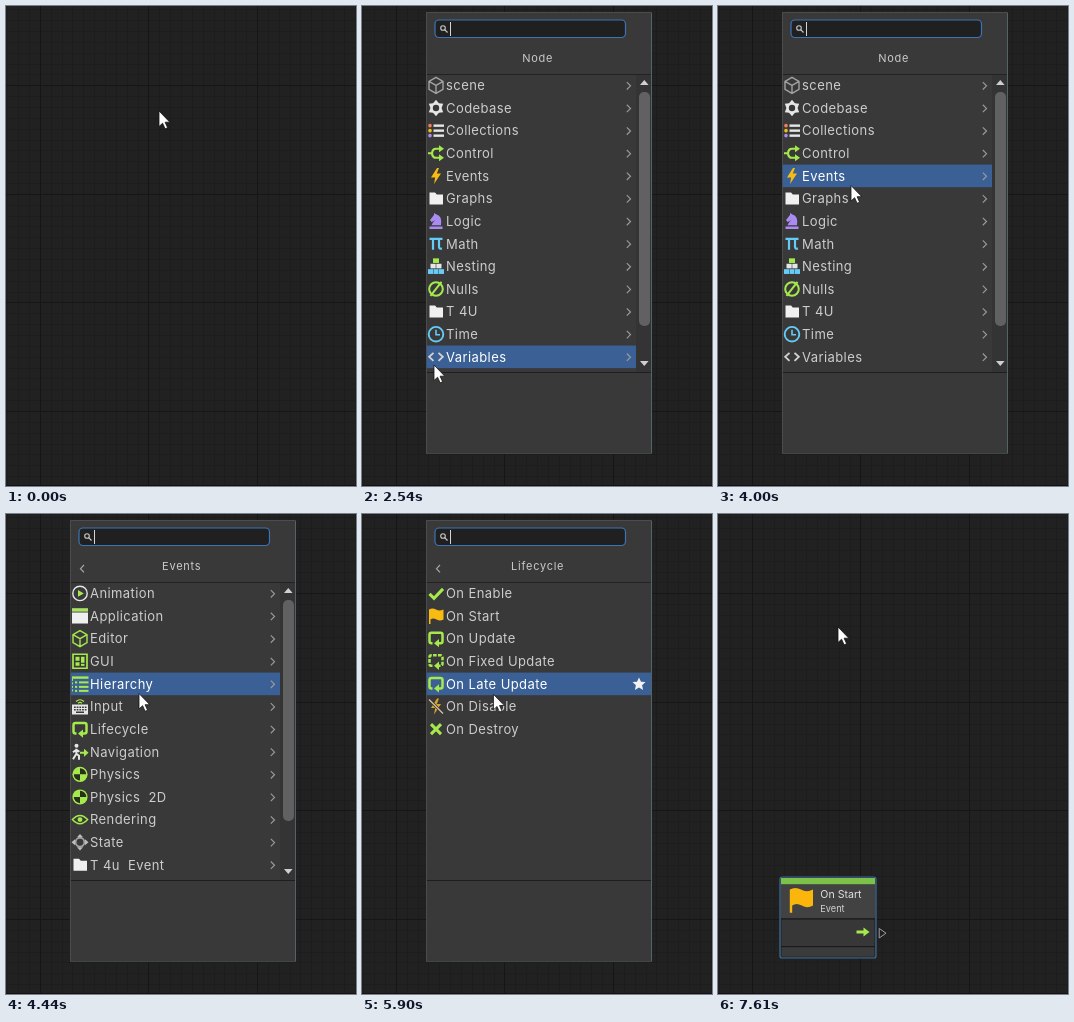
Animation, 350 px wide and 480 px high, one loop 7740 ms. Source, as an HTML page:

```html
<!DOCTYPE html>
<html lang="en">
<head>
<meta charset="utf-8">
<title>Node menu</title>
<style>
html, body { margin: 0; width: 100%; height: 100%; overflow: hidden; background: #212121; }
svg { display: block; width: 350px; height: 480px; }
text { font-family: Inter, Roboto, sans-serif; white-space: pre; }
.row { font-size: 13px; letter-spacing: .42px; fill: #cdcdcd; }
.row.on { fill: #fff; }
.title { font-size: 11px; letter-spacing: .75px; fill: #cacaca; text-anchor: middle; }
</style>
</head>
<body>
<svg id="stage" viewBox="0 0 350 480" xmlns="http://www.w3.org/2000/svg"></svg>
<script>
const LOOP = 7740, ROW = 22.62, TOP = 79.4, WIDTH = 226;
const OPEN = 2410, CLOSE = 7230, SLIDES = [4190, 5330], SLIDE_MS = 250;

const GREEN = '#a6e94d', WHITE = '#e6e6e6', YELLOW = '#f8bb12', BLUE = '#66cbf6', PURPLE = '#a98bf2', GREY = '#a2a2a2';

const fill = (d, c) => `<path d="${d}" fill="${c}"/>`;
const line = (d, c, w = 1.6, more = '') => `<path d="${d}" fill="none" stroke="${c}" stroke-width="${w}" ${more}/>`;
const rect = (x, y, w, h, c, more = '') => `<rect x="${x}" y="${y}" width="${w}" height="${h}" fill="${c}" ${more}/>`;
const ring = (r, c, w, more = '') => `<circle r="${r}" fill="none" stroke="${c}" stroke-width="${w}" ${more}/>`;
const dot = (x, y, r, c) => `<circle cx="${x}" cy="${y}" r="${r}" fill="${c}"/>`;
const text = (x, y, str, more) => `<text x="${x}" y="${y}" ${more}>${str}</text>`;

const cube = c => line('M0-8L7-4V4L0 8L-7 4V-4ZM-7-4L0 0L7-4M0 0V8', c, 1.4);
const bolt = c => fill('M1-8L-5 1.5H-.8L-2 8L5-2.5H.8L3-8Z', c);
const loop = dash => line('M-3.5 4.5H-4.5Q-6.5 4.5-6.5 2.5V-4Q-6.5-6-4.5-6H4.5Q6.5-6 6.5-4V2.5Q6.5 4.5 4.5 4.5H2', GREEN, 2.5,
  dash ? 'stroke-dasharray="3.6 1.3"' : '') + fill('M3 .3V8.7L-2 4.5Z', GREEN);
const flag = 'M-7-6.5Q-3.5-8.5 0-6.5T7.5-6.5V3.5Q4 5.5 .5 3.5T-5.5 3.5V8H-7Z';

const icons = {
  cube: cube(GREY),
  gear: ring(4.5, WHITE, 2.6) + [0, 60, 120, 180, 240, 300].map(a =>
    `<path d="M-2.6-5L0-8.3L2.6-5Z" fill="${WHITE}" transform="rotate(${a})"/>`).join(''),
  list: [['#ee8155', -5], [YELLOW, 0], [PURPLE, 5]].map(([c, y]) =>
    dot(-6, y, 1.8, c) + rect(-2.5, y - 1.2, 10.5, 2.4, WHITE)).join(''),
  branch: line('M-8 0H-4Q-3.5-4.5 0-4.5H4M-4 0Q-3.5 4.5 0 4.5H4', GREEN, 2.2)
    + fill('M3-8L8-4.5L3-1ZM3 1L8 4.5L3 8Z', GREEN),
  bolt: bolt(YELLOW),
  folder: fill('M-6.5-6H-1L.8-4H7V6H-6.5Z', '#f0f0f0'),
  knight: fill('M-6.5 8V5.5H6.5V8ZM-4.5 4.2Q-4 1-.5-.8L-4.5 .8L-6-1.2L-2-6L-2-8L.5-6.6Q6.5-5 5 4.2Z', PURPLE),
  pi: line('M-6.5-4.8H6.5M-3-5V6M3-5V3Q3 5.5 6 4.8', BLUE, 2.2),
  tree: rect(-3, -8, 6, 4.6, GREEN) + rect(-5.5, -2.6, 5.2, 4.6, WHITE)
    + rect(.3, -2.6, 5.2, 4.6, WHITE) + [-8, -2.5, 3].map(x => rect(x, 2.8, 5, 4.8, BLUE)).join(''),
  nil: ring(6.8, GREEN, 2) + line('M-5.5 7L5.5-7', GREEN, 2),
  clock: ring(7.3, BLUE, 1.9) + line('M0-4.5V.5H4', BLUE, 1.6),
  angle: line('M-2.5-4L-6.8 0L-2.5 4M2.5-4L6.8 0L2.5 4', '#d0d0d0', 1.9),
  play: ring(7.2, WHITE, 1.4) + fill('M-2-3.4L3.8 0L-2 3.4Z', GREEN),
  app: rect(-8, -7.5, 16, 15, '#efefef') + rect(-8, -7.5, 16, 3, GREEN) + rect(-8, -4.5, 16, 1, '#484848'),
  editor: cube(GREEN),
  gui: line('M-7-7H7V7H-7Z', GREEN, 1.7) + rect(-4.5, -4.5, 4, 4, GREEN) + rect(1, -4.5, 3.5, 6, GREEN)
    + rect(-4.5, 1, 4, 3.5, GREEN) + rect(1, 2.6, 3.5, 2, GREEN),
  outline: rect(-8, -7.5, 16.5, 2.4, GREEN)
    + [-2.5, 2, 6].map(y => rect(-5, y, 2.2, 2, GREEN) + rect(-1, y, 9.5, 2, GREEN)).join('') + line('M-7.5-5V7.5', GREEN, 1, 'stroke-dasharray="2 1.5"'),
  keys: rect(-8, -2, 16, 10, WHITE) + line('M-6 .8H6.5M-6 3.2H6.5', '#383838', 1.4, 'stroke-dasharray="1.7 1"')
    + line('M-4 5.8H4', '#383838', 1.4) + line('M-4-5Q0-8.5 4-5M-2-3.2Q0-5 2-3.2', GREEN, 1.2),
  loop: loop(false),
  dashed: loop(true),
  walk: dot(-3.5, -6, 2, WHITE) + line('M-3.6-3V2L-1 4V8M-3.6 2L-7 7.5M-3.6-2L-7 .5M-3.6-2L-.6 0', WHITE, 2)
    + line('M0 1H5', GREEN, 2.2) + fill('M4-3L8.5 1L4 5Z', GREEN),
  ball: dot(0, 0, 7.6, GREEN) + fill('M0 0V-6.2A6.2 6.2 0 0 1 6.2 0ZM0 0V6.2A6.2 6.2 0 0 1-6.2 0Z', '#26301c'),
  eye: line('M-7.6 0Q0-8.4 7.6 0Q0 8.4-7.6 0Z', GREEN, 1.5) + dot(0, 0, 2.4, GREEN),
  state: ring(4.4, GREY, 1.9) + fill('M0-8.2L3-5H-3ZM0 8.2L3 5H-3ZM-8.5 0L-5-3V3ZM8.5 0L5-3V3Z', '#bcbcbc'),
  check: line('M-6.5 .5L-2 5L7-4.5', GREEN, 3),
  flag: fill(flag, YELLOW),
  off: bolt('#dba52a') + line('M-7-7L7 7', '#393939', 3) + line('M-7-7L7 7', '#d2c6a4', 1.3),
  cross: line('M-5-5L5 5M5-5L-5 5', GREEN, 3)
};

const panels = [
  { title: 'Node', thumb: 234, rows: [['scene', 'cube'], ['Codebase', 'gear'], ['Collections', 'list'], ['Control', 'branch'],
    ['Events', 'bolt'], ['Graphs', 'folder'], ['Logic', 'knight'], ['Math', 'pi'], ['Nesting', 'tree'], ['Nulls', 'nil'],
    ['T 4U', 'folder'], ['Time', 'clock'], ['Variables', 'angle']] },
  { title: 'Events', thumb: 221, back: true, rows: [['Animation', 'play'], ['Application', 'app'], ['Editor', 'editor'], ['GUI', 'gui'],
    ['Hierarchy', 'outline'], ['Input', 'keys'], ['Lifecycle', 'loop'], ['Navigation', 'walk'], ['Physics', 'ball'],
    ['Physics  2D', 'ball'], ['Rendering', 'eye'], ['State', 'state'], ['T 4u  Event', 'folder']] },
  { title: 'Lifecycle', back: true, rows: [['On Enable', 'check'], ['On Start', 'flag'], ['On Update', 'loop'],
    ['On Fixed Update', 'dashed'], ['On Late Update', 'loop'], ['On Disable', 'off'], ['On Destroy', 'cross']] }
];

// time, x, y of the pointer tip
const path = [
  [450, 153, 105], [700, 177, 162], [1020, 108, 285], [1210, 74, 350], [1270, 72, 359],
  [2540, 72, 359], [3050, 95, 294.5], [3240, 95, 294.5], [3930, 133, 179.5], [4600, 133, 179.5],
  [4890, 133, 205.5], [5700, 133, 205.5], [6470, 127, 108.5], [7170, 127, 108.5], [7550, 120, 113]
];

function grid() {
  const lines = (step, x0, y0) => {
    let d = '';
    for (let x = x0; x < 350; x += step) d += `M${Math.round(x) + .5} 0V480`;
    for (let y = y0; y < 480; y += step) d += `M0 ${Math.round(y) + .5}H350`;
    return d;
  };
  const big = 108.6, small = big / 10;
  return rect(0, 0, 350, 480, '#212121') + line(lines(small, 1.2, 3.2), '#1d1d1d', 1)
    + line(lines(big, 33.6, 79), '#161616', 1) + rect(0, 479, 350, 1, '#180f14');
}

function panel({ title, thumb, back, rows }) {
  const body = rows.map(([label, icon], i) => {
    const y = TOP + i * ROW;
    return `<g transform="translate(74 ${y})">${icons[icon]}</g>` + text(84, y + 4.8, label, 'class="row"')
      + (thumb ? line(`M264.8 ${y - 3.3}l3.7 3.7l-3.7 3.7`, '#989898', 1.2) : '');
  }).join('');
  const star = 'M0-6.5L2-2.2L6.5-1.8L3.1 1.3L4.1 6L0 3.5L-4.1 6L-3.1 1.3L-6.5-1.8L-2-2.2Z';
  const bar = rect(274, 69, 15, 297, '#343434') + rect(277, 86, 11, thumb, '#616161', 'rx="5"')
    + fill('M278 79L282.3 74L286.6 79ZM278 355L282.3 360L286.6 355Z', '#cfcfcf');
  return `<g class="panel">${text(175.7, 56, title, 'class="title"')}
    ${back ? line('M78 51L74.5 54.7L78 58.4', '#a6a6a6', 1.2) : ''}
    <g class="hover">${rect(64.5, -11.3, thumb ? 209.5 : 224.5, 22.6, '#3a6096')}
    ${thumb ? '' : `<g transform="translate(277)">${fill(star, '#f2f2f2')}</g>`}</g>${body}${thumb ? bar : ''}</g>`;
}

const menu = rect(64, 6, 226, 442, '#393939') + line('M64.5 448V6.5H289.5', '#4c4c4c', 1)
  + line('M289.5 7V448', '#526566', 1) + rect(64, 447, 226, 1, '#3f4846')
  + rect(73, 14, 190.5, 17.5, '#202020', 'rx="4" stroke="#3d74b5" stroke-width="1.2"')
  + ring(2.3, '#c8c8c8', 1.1, 'cx="81" cy="22"') + line('M82.7 23.7L85.5 26.5', '#c8c8c8', 1.2) + rect(88, 16, 1, 14, '#d5d5d5')
  + rect(65, 68, 224, 1, '#222')
  + `<g clip-path="url(#list)">${panels.map(panel).join('')}</g>` + rect(65, 366, 224, 1, '#1e1e1e');

const node = rect(62, 363, 96, 81, '#2b2b2b', 'rx="2" stroke="#3c6c9e" stroke-width="1.2"')
  + rect(63, 364, 94, 6.5, '#7cc24a') + rect(63, 370.5, 94, 34, '#424242') + rect(64, 405.5, 92, 26.5, '#373737')
  + rect(64, 433, 92, 9.5, '#3b3b3b') + rect(63, 404.3, 94, 1.2, '#1b1b1b') + rect(63, 432, 94, 1.2, '#1b1b1b')
  + `<g transform="translate(83 386) scale(1.6)">${fill(flag, '#fbb60b')}</g>`
  + text(102.3, 384, 'On Start', 'font-size="10.6" fill="#e0e0e0"') + text(102.3, 398, 'Event', 'font-size="9.2" fill="#d2d2d2"')
  + line('M138.5 418H147', GREEN, 3) + fill('M145.5 413.5L151.5 418L145.5 422.5Z', GREEN)
  + line('M161.2 414.5L168 419.2L161.2 424Z', '#a69aa4', 1);

const pointer = 'M0 0V15.5L3.6 12.2L6.1 17.8L8.6 16.7L6.1 11.2H10.8Z';
const stage = document.getElementById('stage');
stage.innerHTML = `<clipPath id="list"><rect x="64.5" y="36" width="224.5" height="330"/></clipPath>${grid()}
  <g id="node">${node}</g><g id="menu">${menu}</g>
  <path id="pointer" d="${pointer}" fill="#fff" stroke="#161616" stroke-width=".8"/>`;

const $ = id => document.getElementById(id);
const show = (el, on) => el.setAttribute('visibility', on ? 'inherit' : 'hidden');
const views = [...document.querySelectorAll('.panel')].map(el => ({
  el, hover: el.querySelector('.hover'), labels: [...el.querySelectorAll('.row')]
}));

// The picture advances in alternating 60 and 130 ms holds.
function hold(t) {
  if (t < 450) return 0;
  const start = [7170, 3810, 450].find(a => t >= a), r = (t - start) % 190;
  return t - (r < 60 ? r : r - 60);
}

function tip(t) {
  const i = path.findIndex(p => p[0] > t);
  if (i === 0) return path[0].slice(1);
  if (i < 0) return path[path.length - 1].slice(1);
  const [a, x, y] = path[i - 1], [b, u, v] = path[i], k = (t - a) / (b - a);
  return [x + (u - x) * k, y + (v - y) * k];
}

function draw(now) {
  const t = hold(now % LOOP), [x, y] = tip(t);
  const depth = SLIDES.reduce((sum, s) => sum + Math.min(1, Math.max(0, (t - s) / SLIDE_MS)), 0);
  const row = Math.floor((y + .8 - TOP + ROW / 2) / ROW);
  const open = t >= OPEN && t < CLOSE;
  $('pointer').setAttribute('transform', `translate(${x} ${y})`);
  $('menu').setAttribute('display', open ? 'inline' : 'none');
  show($('node'), t >= CLOSE);
  views.forEach(({ el, hover, labels }, i) => {
    show(el, Math.abs(i - depth) < 1);
    el.setAttribute('transform', `translate(${(i - depth) * WIDTH} 0)`);
    show(hover, row >= 0 && row < labels.length);
    hover.setAttribute('transform', `translate(0 ${TOP + row * ROW})`);
    labels.forEach((label, n) => label.classList.toggle('on', n === row));
  });
}

const begin = performance.now();
function tick() {
  draw(performance.now() - begin);
  requestAnimationFrame(tick);
}
tick();
</script>
</body>
</html>
```
